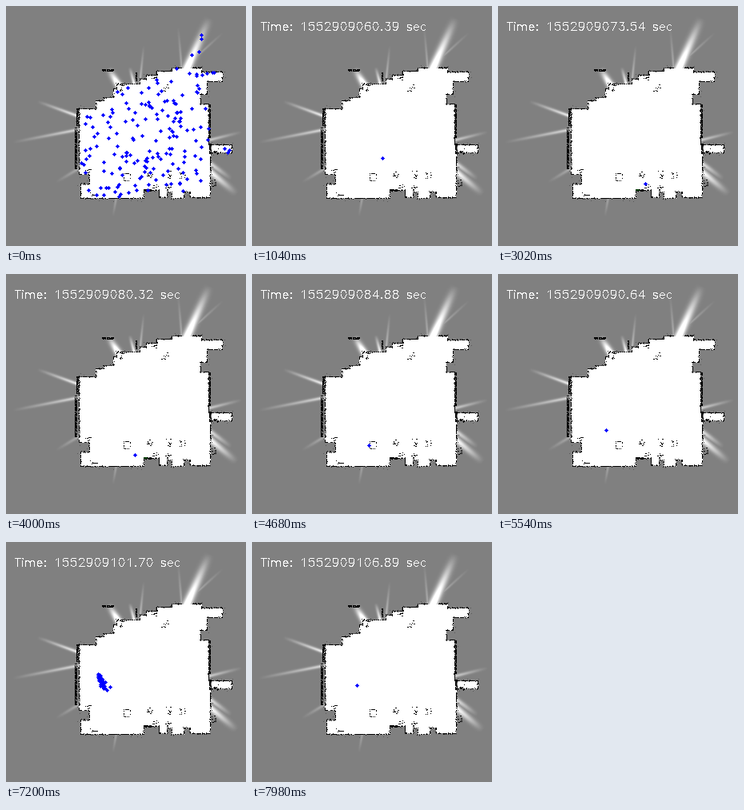
Animation, 300 px wide and 300 px high, one loop 8000 ms. Source, as a matplotlib script:

```python
import numpy as np
import matplotlib.pyplot as plt
from matplotlib.animation import FuncAnimation
from matplotlib.path import Path

SIZE, STEP, FRAMES = 300, 20, 400
START = 1552909000
yy, xx = np.mgrid[0:SIZE, 0:SIZE]


# ---------- occupancy map ----------
# room outline as alternating runs: next x, next y, next x, ...
RUNS = [91, 128, 112, 118, 122, 114, 134, 103, 138, 97, 167, 91, 175, 86, 188,
        81, 207, 77, 244, 82, 270, 94, 251, 110, 243, 122, 253, 173, 282, 183,
        255, 239, 230, 232, 222, 240, 207, 232, 201, 239, 191, 230, 172, 240,
        93, 222, 104, 210]

# x, y, direction in degrees, length, width, strength
RAYS = [(226, 77, -66, 69, 5, 1.5), (224, 75, -66, 46, 3, .8),
        (219, 75, -95, 50, 1.5, .35), (234, 66, -42, 50, 1.5, .35),
        (140, 98, -122, 25, 4, 1.6), (160, 98, -105, 23, 2, 1.1),
        (167, 94, -84, 46, 1.5, .5), (89, 137, 200, 54, 2, .9),
        (90, 154, 169, 84, 2, .7), (90, 203, 149, 33, 2, .35),
        (254, 206, 40, 45, 4, 1.1), (254, 196, 36, 34, 3, .8),
        (254, 167, -14, 42, 2, .6), (137, 241, 100, 22, 1.5, .3)]

# thick wall parts: x, y, width, height
BARS = [(86, 152, 3, 52), (88, 128, 3, 22), (120, 79, 15, 3), (162, 83, 2, 11),
        (254, 123, 2, 42), (172, 229, 10, 3), (254, 172, 3, 13)]

SPECKS = [(198, 102), (186, 90), (143, 102), (180, 211), (205, 212), (222, 213),
          (186, 227), (204, 229), (103, 206), (110, 236), (262, 182), (260, 222)]


def corners():
    x, y = RUNS[0::2], RUNS[1::2]
    pts = []
    for k in range(len(x)):
        pts += [(x[k], y[k]), (x[(k + 1) % len(x)], y[k])]
    return pts


def ray(img, x0, y0, angle, length, width, power):
    c, s = np.cos(np.radians(angle)), np.sin(np.radians(angle))
    u = ((xx - x0) * c + (yy - y0) * s) / length
    v = (yy - y0) * c - (xx - x0) * s
    glow = power * np.clip(1 - u, 0, 1) * np.exp(-(v / width) ** 2)
    glow[u < -.05] = 0
    np.maximum(img, 128 + 127 * np.clip(glow, 0, 1), out=img)


def segment(a, b):
    n = int(max(abs(b[0] - a[0]), abs(b[1] - a[1]))) + 1
    return np.linspace(a, b, n)


def build_map():
    rng = np.random.default_rng(7)
    img = np.full((SIZE, SIZE), 128.0)
    for r in RAYS:
        ray(img, *r)
    outline = corners()
    grid = np.column_stack([xx.ravel(), yy.ravel()])
    room = Path(outline).contains_points(grid).reshape(SIZE, SIZE)
    img[room] = 255

    for a, b in zip(outline, outline[1:] + outline[:1]):
        for x, y in segment(a, b).round().astype(int):
            if y < 79 and 219 < x < 233:      # gap for the long ray
                continue
            if rng.random() < .72:
                img[y, x] = 0
            if rng.random() < .35:
                ox, oy = rng.integers(-1, 2, 2)
                img[y + oy, x + ox] = 30
            ox, oy = rng.integers(-4, 5, 2)
            if rng.random() < .12 and not room[y + oy, x + ox]:
                img[y + oy, x + ox] = 90

    for x, y, w, h in BARS:
        part = img[y:y + h, x:x + w]
        part[rng.random(part.shape) < .78] = 0
    for spot in SPECKS:
        for x, y in rng.normal(spot, 2.5, (9, 2)).astype(int):
            img[y, x:x + rng.integers(1, 3)] = 0

    box = img[209:219, 147:156]               # small crate
    edge = np.ones(box.shape, bool)
    edge[1:-1, 1:-1] = False
    box[edge & (rng.random(box.shape) < .55)] = 0
    return np.repeat(img.astype(np.uint8)[:, :, None], 3, axis=2), room


BASE, FREE = build_map()


# ---------- single-stroke lettering, 21 units high ----------
def arc(cx, cy, rx, ry, a0=0, a1=360):
    t = np.radians(np.linspace(a0, a1, 25))
    return [(cx + rx * np.cos(k), cy + ry * np.sin(k)) for k in t]


def dot(y):
    return arc(5, y, 1, 1)


def hump(x):
    return arc(x + 5.5, 8.5, 5.5, 5.5, 160, 0) + [(x + 11, 0)]


DIGITS = [
    [arc(10, 10.5, 7, 10.5)],
    [[(6, 17), (11, 21), (11, 0)]],
    [arc(10, 15.5, 6, 5.5, 175, -25) + [(3, 0), (17, 0)]],
    [[(5, 21), (16, 21), (10, 13)] + arc(10.5, 6.5, 6.5, 6.5, 70, -155)],
    [[(13, 0), (13, 21), (3, 7), (18, 7)]],
    [[(15, 21), (5, 21), (4, 12)] + arc(10, 7, 7, 7, 135, -150)],
    [arc(11.5, 10.5, 7.5, 10.5, 50, 200), arc(10.5, 6.5, 6.5, 6.5)],
    [[(3, 21), (17, 21), (7, 0)]],
    [arc(10, 16.5, 5.5, 4.5), arc(10, 6, 7, 6)],
    [arc(9.5, 14.5, 6.5, 6.5), arc(8.5, 10.5, 7.5, 10.5, 20, -130)],
]
STEM = [(4, 14), (4, 0)]
# advance width, strokes
GLYPHS = {
    "T": (16, [[(8, 21), (8, 0)], [(1, 21), (15, 21)]]),
    "i": (8, [STEM, dot(20)]),
    "m": (30, [STEM, hump(4), hump(15)]),
    "e": (18, [[(3, 8), (15, 8)] + arc(9, 7, 6, 7, 10, 320)]),
    "s": (17, [arc(8.5, 10.5, 5.5, 3.5, 30, 270) + arc(8.5, 3.5, 5.5, 3.5, 90, -150)]),
    "c": (18, [arc(9, 7, 6, 7, 40, 320)]),
    ":": (10, [dot(13), dot(1)]),
    ".": (10, [dot(1)]),
    " ": (16, []),
}
GLYPHS.update({str(n): (20, strokes) for n, strokes in enumerate(DIGITS)})


def write(img, text, x, y, scale=.5):
    for ch in text:
        width, strokes = GLYPHS[ch]
        for line in strokes:
            pts = np.array(line) * (scale, -scale) + (x, y)
            for a, b in zip(pts, pts[1:]):
                px = np.floor(np.vstack([segment(a, b), b]) + .5).astype(int)
                img[px[:, 1], px[:, 0]] = 255
        x += width * scale


# ---------- motion ----------
# ms, seconds past START
CLOCK = np.array([(20, 53.6), (1040, 60.39), (3020, 73.54), (4000, 80.32),
                  (5540, 90.64), (6520, 97.17), (7980, 106.89)])
# ms, x, y
TRACK = np.array([(0, 158, 188), (1040, 163, 190), (1640, 174, 192),
                  (2460, 185, 208), (3020, 184, 222), (3280, 181, 227),
                  (4000, 161, 226), (4940, 140, 209), (5540, 135, 195),
                  (6520, 123, 175), (7400, 117, 172), (7980, 131, 179)])


def pose(ms):
    return np.array([np.interp(ms, TRACK[:, 0], TRACK[:, k]) for k in (1, 2)])


def make_particles():
    rng = np.random.default_rng(21)
    ys, xs = np.nonzero(FREE)
    pick = rng.choice(len(xs), 170, replace=False)
    pts = np.column_stack([xs[pick], ys[pick]])
    pts = np.vstack([pts, [(244, 36), (244, 41), (241, 57), (232, 61)]])
    score = np.hypot(*(pts - pose(0)).T) / 60 + rng.exponential(1, len(pts))
    return pts[np.argsort(score)]


def make_cloud():
    rng = np.random.default_rng(4)
    u = rng.uniform(-1, 1, (100, 1))
    body = u * (5, 12) + rng.normal(0, 1.5, (100, 2))
    return np.vstack([body, [(9, 3), (17, 12), (11, 18)]])


SCATTER, CLOUD = make_particles(), make_cloud()


def stamp(img, pts):
    for x, y in np.floor(np.asarray(pts) + .5).astype(int):
        for d in range(-2, 3):
            w = 2 - abs(d)
            img[y + d, x - w:x + w + 1] = (0, 0, 255)


def render(i):
    ms = i * STEP
    img = BASE.copy()
    rng = np.random.default_rng(1000 + i)
    if 2700 <= ms <= 4100:
        img[229:231, 172:177] = (0, 60, 0)

    # the wide guess thins out as resampling picks the best candidates
    alive = int(len(SCATTER) * np.exp(-i / 6))
    noise = rng.normal(0, .6, (alive, 2)) if i else 0
    stamp(img, SCATTER[:alive] + pose(ms) - pose(0) + noise)
    if i:
        spread = np.interp(ms, [5760, 6500, 7000, 7600], [0, 1, 1, 0])
        if spread > 0:
            noise = rng.normal(0, .5 * spread, CLOUD.shape)
            stamp(img, pose(ms) + CLOUD * spread + noise)
        else:
            stamp(img, [pose(ms)])
        now = START + np.interp(ms, CLOCK[:, 0], CLOCK[:, 1])
        write(img, f"Time: {now:.2f} sec", 10, 30)
    return img


fig = plt.figure(figsize=(3, 3), dpi=100)
ax = fig.add_axes([0, 0, 1, 1])
ax.axis("off")
view = ax.imshow(render(0), interpolation="nearest", aspect="auto")


def update(i):
    view.set_data(render(i))
    return [view]


anim = FuncAnimation(fig, update, frames=FRAMES, interval=STEP,
                     repeat=True, repeat_delay=0, blit=True)
plt.show()
```
